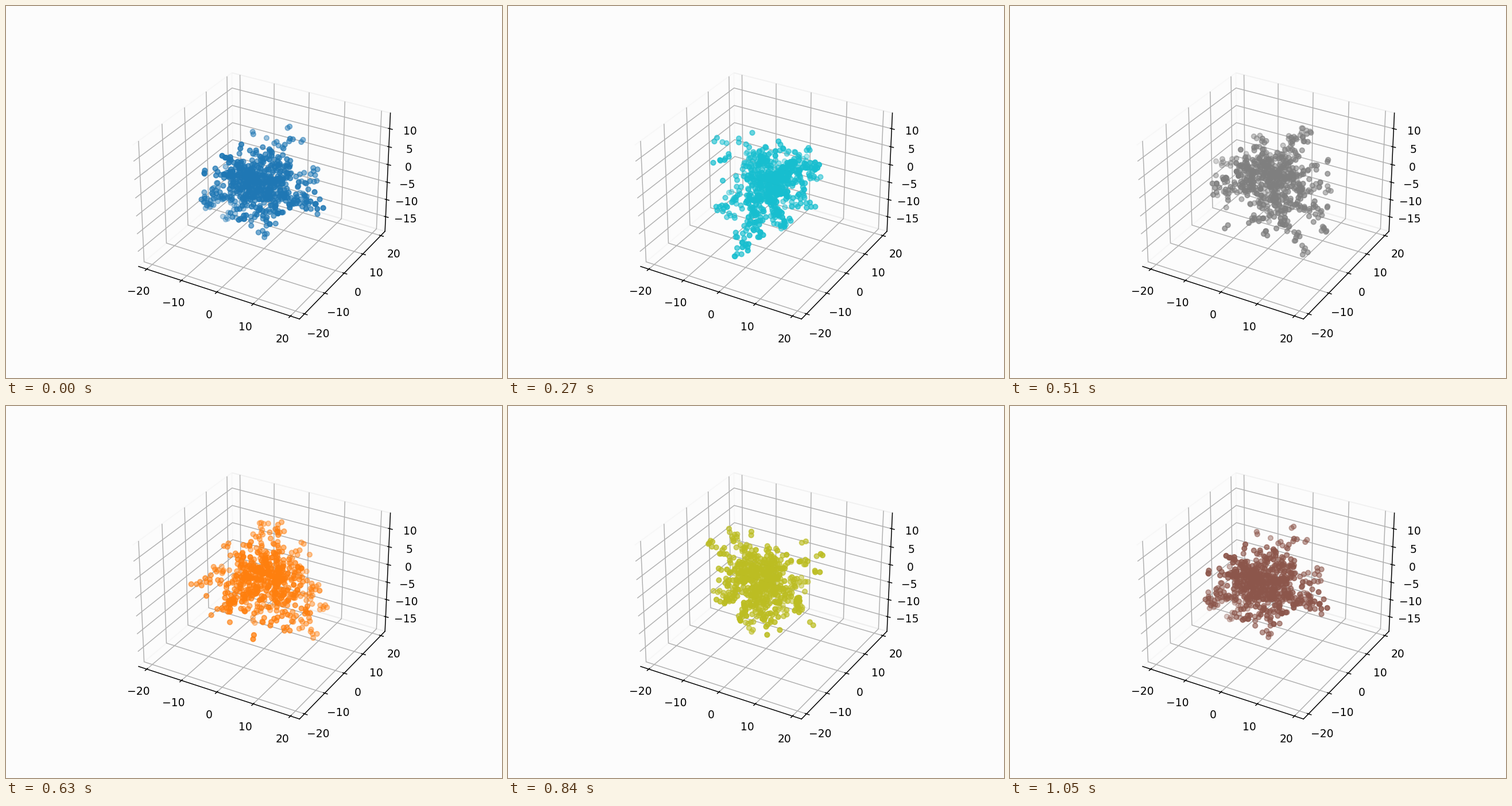
These frames come from a looping animation (864x648 px, 1080 ms). A matplotlib script:

```python
import numpy as np
import matplotlib.pyplot as plt
from matplotlib.animation import FuncAnimation

FRAMES = 36
INTERVAL = 30
POINTS = 620
CORE = 220
STEP, GAP = 1.1, 0.8
BG = "#fcfcfc"

# Ends of the cluster's arms as (right, back, height) from the camera's side
TIPS = [
    (14, -11, -1), (13, -4, -7), (11, 4, 0), (6, 5, 8), (4, -10, 6),
    (4, -13, -2), (0, -4, -13), (-9, 8, -15), (-5, 12, -5), (-15, 5, -10),
    (-14, -3, -4), (-13, -2, 4), (-9, -7, 11), (-7, -12, 9),
]


def grow_cluster(rng):
    """Fill a soft core, reach out to the tips, then stick points on at random."""
    cloud = [np.zeros(3)]

    def add(p):
        if np.linalg.norm(np.array(cloud) - p, axis=1).min() > GAP:
            cloud.append(p)

    for tip in np.array(TIPS, dtype=float):
        reach = np.linalg.norm(tip)
        for t in np.arange(1, 0.2, -STEP / reach):
            add(t * tip + rng.normal(0, 0.6, 3))
    for p in rng.normal(0, (5.2, 5.2, 4.4), (CORE, 3)):
        add(p)
    while len(cloud) < POINTS:
        way = rng.normal(size=3)
        base = cloud[rng.integers(len(cloud))]
        add(base + STEP * way / np.linalg.norm(way))
    return np.array(cloud)


def spin(pts, angle):
    c, s = np.cos(angle), np.sin(angle)
    x, y, z = pts.T
    return x * c - y * s, x * s + y * c, z


cloud = grow_cluster(np.random.default_rng(7))

fig = plt.figure(figsize=(6.4, 4.8), dpi=135, facecolor=BG)
ax = fig.add_subplot(projection="3d", facecolor=BG)
half = 22.4
ax.set_xlim(-half, half, view_margin=0)
ax.set_ylim(-half, half, view_margin=0)
ax.set_zlim(-2.5 - 0.75 * half, -2.5 + 0.75 * half, view_margin=0)
for axis in (ax.xaxis, ax.yaxis, ax.zaxis):
    axis.pane.fill = False

dots = []


def draw(i):
    while dots:
        dots.pop().remove()
    angle = np.radians(30) + 2 * np.pi * i / (FRAMES - 1)
    dots.append(ax.scatter(*spin(cloud, angle), color=f"C{i % 10}"))
    return dots


anim = FuncAnimation(fig, draw, frames=FRAMES, init_func=lambda: draw(0),
                     interval=INTERVAL, repeat=True, repeat_delay=0)
plt.show()
```
